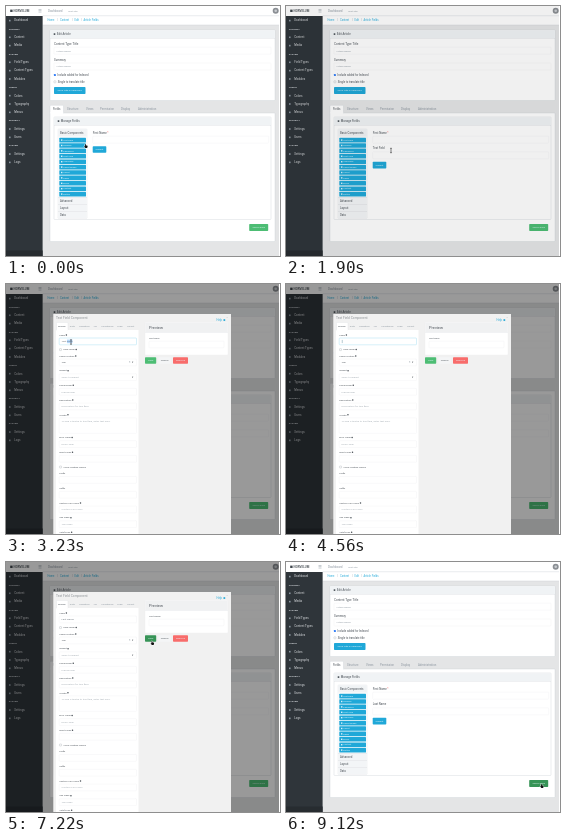
An HTML page with a canvas for the animation above (9500 ms loop, 274x250 px).

```html
<!DOCTYPE html>
<html lang="en">
<head>
<meta charset="utf-8">
<title>Form builder</title>
<style>
  html, body { margin: 0; width: 100%; height: 100%; overflow: hidden; background: #e4e5e6; }
  canvas { display: block; width: 274px; height: 250px; }
</style>
</head>
<body>
<canvas id="stage"></canvas>
<script>
const W = 274, H = 250, PAGE = 273, SIDE = 36.6, LOOP = 9500, STEP = 190;
const canvas = document.getElementById('stage');
const dpr = window.devicePixelRatio || 1;
canvas.width = W * dpr;
canvas.height = H * dpr;
const ctx = canvas.getContext('2d');

const INK = '#454c53', MUTED = '#8a949e', PALE = '#a3abb2';
const LINE = '#dce0e3', FAINT = '#eceef0';
const BLUE = '#20a8d8', GREEN = '#4dbd74', RED = '#f86c6b', DARK = '#2f353a';

function rect(x, y, w, h, fill) {
  ctx.fillStyle = fill;
  ctx.fillRect(x, y, w, h);
}

function box(x, y, w, h, fill, line = LINE, r = 0.7) {
  ctx.beginPath();
  ctx.roundRect(x, y, w, h, r);
  ctx.fillStyle = fill;
  ctx.fill();
  if (!line) return;
  ctx.strokeStyle = line;
  ctx.lineWidth = 0.35;
  ctx.stroke();
}

function disc(x, y, r, fill) {
  ctx.beginPath();
  ctx.arc(x, y, r, 0, Math.PI * 2);
  ctx.fillStyle = fill;
  ctx.fill();
}

// Fonts are set ten times larger and scaled down to keep fractional advances.
function setFont(size, weight = 400) {
  ctx.font = `${weight} ${size * 10}px Roboto, "Liberation Sans", sans-serif`;
}

function text(s, x, y, size = 3, color = INK, weight = 400, align = 'left') {
  ctx.save();
  ctx.translate(x, y);
  ctx.scale(0.1, 0.1);
  setFont(size, weight);
  ctx.textAlign = align;
  ctx.textBaseline = 'middle';
  ctx.fillStyle = color;
  ctx.fillText(s, 0, 0);
  ctx.restore();
}

function textWidth(s, size) {
  setFont(size);
  return ctx.measureText(s).width / 10;
}

function button(s, x, y, w, h, fill, color = '#e8f6fb', size = 2.5) {
  box(x, y, w, h, fill, null);
  text(s, x + w / 2, y + h / 2 + 0.15, size, color, 400, 'center');
}

function checkbox(x, y, on) {
  box(x - 1, y - 1, 2, 2, on ? '#2f7cf6' : '#fff', on ? null : '#a4aab0', 0.4);
}

// Cursor keys: time, x, y
const PATH = [
  [0, 79, 138], [190, 79, 138], [380, 78, 135], [1140, 105, 144.5], [2090, 105, 144.5],
  [2850, 68, 58], [3040, 68, 58], [3610, 56.5, 58], [6080, 56.5, 58],
  [7220, 145.5, 79], [7410, 145, 77], [7600, 145, 77], [8740, 255, 222], [LOOP, 255, 222]
];

function cursorAt(t) {
  const i = PATH.findIndex(k => k[0] > t);
  const [t0, x0, y0] = PATH[i - 1], [t1, x1, y1] = PATH[i];
  const p = (t - t0) / (t1 - t0), e = p * p * (3 - 2 * p);
  return [x0 + (x1 - x0) * e, y0 + (y1 - y0) * e];
}

function cursorKind(t) {
  if (t < 1520) return 'hand';
  if (t < 4560) return 'beam';
  if (t < 6270) return 'none';
  if (t < 7030) return 'arrow';
  if (t < 7410) return 'hand';
  return t < 8740 ? 'arrow' : 'hand';
}

function drawCursor(kind, x, y) {
  if (kind === 'none') return;
  ctx.save();
  ctx.translate(x, y);
  ctx.lineJoin = 'round';
  if (kind === 'beam') {
    ctx.beginPath();
    ctx.moveTo(-0.9, -2.2); ctx.lineTo(0.9, -2.2);
    ctx.moveTo(0, -2.2); ctx.lineTo(0, 2.2);
    ctx.moveTo(-0.9, 2.2); ctx.lineTo(0.9, 2.2);
    ctx.strokeStyle = '#333';
    ctx.lineWidth = 0.6;
    ctx.stroke();
  } else {
    const arrow = [[0, 0], [0, 4.2], [1, 3.3], [1.7, 4.8], [2.3, 4.5], [1.6, 3.1], [2.9, 3]];
    const hand = [[0, 0], [0.8, 0], [0.9, 1.6], [3, 2.1], [3, 3.6], [2.4, 4.8], [0.4, 4.8], [-1, 2.8], [-0.6, 2.3], [0, 2.8]];
    ctx.scale(0.85, 0.85);
    ctx.beginPath();
    (kind === 'arrow' ? arrow : hand).forEach(p => ctx.lineTo(...p));
    ctx.closePath();
    ctx.strokeStyle = '#fff';
    ctx.lineWidth = 0.8;
    ctx.stroke();
    ctx.fillStyle = '#111';
    ctx.fill();
  }
  ctx.restore();
}

// Headings are in capitals; rows share one pitch.
const MENU = ['Dashboard', 'CONTENT', 'Content', 'Media', 'SYSTEM', 'Field Types',
  'Content Types', 'Modules', 'THEME', 'Colors', 'Typography', 'Menus', 'SECURITY',
  'Settings', 'Users', 'SYSTEM', 'Settings', 'Logs'];

function drawFrame() {
  rect(0, 0, W, H, '#e4e5e6');
  rect(0, 0, W, 10, '#fff');
  rect(SIDE, 10, W - SIDE, 9, '#fff');
  rect(SIDE, 9.7, W - SIDE, 0.4, '#c8ced3');
  rect(SIDE, 18.8, W - SIDE, 0.4, '#c8ced3');

  rect(4.2, 3.6, 2.4, 2.4, '#3f464c');
  text('NORVELUM', 7.5, 4.9, 3, '#3f464c', 500);
  for (let i = 0; i < 3; i++) rect(32.5, 3.4 + i * 1.2, 3, 0.45, MUTED);
  text('Dashboard', 42, 4.9, 3, MUTED);
  text('Visit site', 62, 4.9, 2.5, MUTED);
  disc(269.7, 4.8, 3, '#8b8f94');
  disc(269.7, 4.8, 1.3, '#c9ccd0');

  [['Home', 41.5], ['Content', 54], ['Edit', 68.5], ['Article Fields', 77.5]]
    .forEach(([s, x]) => text(s, x, 14.7, 2.6, BLUE));
  [51, 66, 75].forEach(x => text('/', x, 14.7, 2.6, MUTED));

  rect(0, 10, SIDE, H - 10, DARK);
  rect(0, 244.5, SIDE, 5.5, '#272c30');
  MENU.forEach((s, i) => {
    const y = 14.6 + i * 8.34;
    if (s === s.toUpperCase()) return text(s, 2.8, y, 2.4, '#d0d4d8', 700);
    rect(3, y - 0.8, 1.6, 1.6, MUTED);
    text(s, 8.2, y, 2.9, '#dde0e3');
  });
}

function card(x, y, w, h, title) {
  box(x, y, w, h, '#fff', '#c8ced3');
  rect(x + 0.2, y + 0.2, w - 0.4, 7.8, '#f0f3f5');
  rect(x, y + 8, w, 0.3, '#c8ced3');
  rect(x + 3.7, y + 3.3, 1.6, 1.6, INK);
  text(title, x + 6.8, y + 4.3, 2.9);
}

function input(x, y, w, s, h = 7) {
  box(x, y, w, h, '#fff', FAINT);
  if (s) text(s, x + 2.3, y + 3.6, 2.5, MUTED);
}

function drawArticleCard() {
  card(44, 24, 225, 70.5, 'Edit Article');
  text('Content Type Title', 48, 38.2, 3);
  input(48, 41.2, 217, 'Article Fields');
  text('Summary', 48, 54, 2.8);
  input(48, 57, 217, 'Article Fields');
  checkbox(48.9, 69, true);
  text('Include added for Indexed', 51.5, 69.1, 2.7);
  checkbox(48.9, 75.8, false);
  text('Single to translate title', 51.8, 75.9, 2.7);
  button('Save Title & Summary', 48, 81, 31.5, 7, BLUE);
}

const PARTS = ['Text Field', 'Number', 'Password', 'Text Area', 'Checkbox', 'Select Boxes',
  'Select', 'Radio', 'Email', 'Content', 'Button'];

function part(s, x, y, w, fill = BLUE) {
  box(x, y, w, 4.6, fill, null, 0.5);
  rect(x + 1.7, y + 1.6, 1.4, 1.4, '#d9f0f9');
  text(s, x + 4, y + 2.4, 2.3, '#e8f6fb');
}

function drawBuilder(t) {
  box(44, 107, 225, 128.5, '#fff', '#c8ced3');
  box(44, 99.3, 13.5, 8, '#fff', '#c8ced3');
  rect(44.3, 106, 12.9, 2, '#fff');
  text('Fields', 47, 103.6, 2.8);
  [['Structure', 61], ['Views', 80], ['Permission', 94], ['Display', 115], ['Administration', 132]]
    .forEach(([s, x]) => text(s, x, 103.6, 2.8, MUTED));

  card(48, 111, 217, 102.5, 'Manage Fields');
  box(52, 123, 29, 89.5, '#fff', LINE);
  rect(52.2, 123.2, 28.6, 7.4, '#f0f3f5');
  text('Basic Components', 54, 126.9, 2.8);
  const over = t >= 380 && t < 1520;
  PARTS.forEach((s, i) => part(s, 53.3, 131.8 + i * 5.4, 26.7, over && i === 0 ? '#1985ac' : BLUE));
  ['Advanced', 'Layout', 'Data'].forEach((s, i) => {
    const y = 191.4 + i * 7;
    rect(52.2, y, 28.6, 6.8, '#f3f5f7');
    rect(52, y - 0.2, 29, 0.3, '#c8ced3');
    text(s, 54, y + 3.5, 2.8);
  });

  text('First Name', 86.7, 127.3, 2.9);
  text('*', 101.2, 127.5, 2.9, RED);
  input(86.7, 130.2, 176, '');
  const dragging = t >= 760 && t < 1520;
  if (dragging) part('Text Field', 86.7, 140.5, 176, '#7fcde8');
  if (t >= 1520) {
    text(t < 7410 ? 'Text Field' : 'Last Name', 86.7, 142.6, 2.8);
    input(86.7, 145.8, 176, '');
  }
  button('Submit', 86.7, t >= 1520 ? 155.8 : dragging ? 147 : 140.2, 13.6, 6.6, BLUE);
  button('Save Fields', 243.2, 218, 19, 7, t >= 9120 ? '#379457' : t >= 8740 ? '#3ea662' : GREEN);
  if (t >= 570 && t < 1520) {
    const [x, y] = cursorAt(t);
    ctx.globalAlpha = 0.8;
    part('Text Field', x - 25, y - 2.3, 26.7);
    ctx.globalAlpha = 1;
  }
}

// Settings: label, label y, placeholder
const SETTINGS = [
  ['Label Position', 71.9, 'Top'], ['Widget', 86.7, 'Select a widget'],
  ['Placeholder', 101.3, 'Placeholder'], ['Description', 116, 'Description for this field.'],
  ['Tooltip', 130.8, 'To add a tooltip to this field, enter text here.'],
  ['Error Label', 153.6, 'Error Label'], ['Input Mask', 168.3, ''],
  ['Prefix', 189.4, ''], ['Suffix', 204.2, ''],
  ['Custom CSS Class', 219, 'Custom CSS Class'], ['Tab Index', 233.7, 'Tab Index'],
  ['Autofocus', 248.2, '']
];
const SMALL = 2.4, HINT = 2.55;

function settingLabel(s, y) {
  text(s, 53.2, y, SMALL);
  if (s.endsWith('fix')) return;
  disc(54.6 + textWidth(s, SMALL), y, 0.75, INK);
}

function labelValue(t) {
  if (t < 4560) return 'Text Field';
  if (t < 4750) return '';
  const k = Math.max(0, Math.min(6, (t - 4940) / STEP));
  return 'Last Name'.slice(0, Math.round(1 + 8 * k / 6));
}

function drawLabelInput(t) {
  const value = labelValue(t), focus = t >= 3040 && t < 7030;
  settingLabel('Label', 51);
  box(53.2, 54, 77.3, 6.8, '#fff', focus ? '#8ad4ee' : FAINT);
  const width = textWidth(value, HINT);
  if (t >= 3040 && t < 4560) {
    const p = Math.min(1, (t - 2850) / 760);
    rect(55.5 + width * (1 - p), 55.6, width * p, 3.6, '#b3d7fb');
  }
  text(value, 55.5, 57.6, HINT, '#68717a');
  if (focus && t >= 4560) rect(55.9 + width, 55.9, 0.4, 3.2, '#4b7c8f');
}

function drawDialog(t) {
  rect(47.3, 30, 177.7, 220, '#f1f1f1');
  text('Text Field Component', 50, 34.3, 3.25, '#8b9095');
  text('Help', 210.5, 36.2, 2.7, BLUE);
  rect(217.5, 35.2, 1.7, 1.7, BLUE);
  text('×', 220.5, 33.4, 2.4, '#aaa');

  rect(50, 46, 82.5, 204, '#fff');
  box(50.5, 38.5, 11.5, 8, '#fff', LINE);
  rect(50.8, 45.5, 10.9, 1.5, '#fff');
  [['Display', 52], ['Data', 63.8], ['Validation', 73], ['API', 87.5], ['Conditional', 95.3],
    ['Logic', 111], ['Layout', 121]]
    .forEach(([s, x], i) => text(s, x, 42.6, SMALL, i ? MUTED : INK));

  drawLabelInput(t);
  checkbox(54.5, 65.6, false);
  text('Hide Label', 57.3, 65.7, SMALL);
  disc(70.2, 65.6, 0.75, INK);
  SETTINGS.forEach(([s, y, hint], i) => {
    settingLabel(s, y);
    box(53.2, y + 3.1, 77.3, i === 4 ? 15.5 : 6.8, '#fff', FAINT);
    text(hint, 55.5, y + 6.7, HINT, i === 0 ? INK : PALE);
    if (i < 2) text('▾', 126, y + 6.6, 2.6);
  });
  text('×', 123, 78.5, 2.6, MUTED);
  checkbox(54.5, 183, false);
  text('Allow Multiple Masks', 57.3, 183.1, SMALL);

  box(139, 38.5, 83, 32.5, '#fff', FAINT);
  rect(139.2, 38.7, 82.6, 9.7, '#f0f1f2');
  rect(139, 48.4, 83, 0.3, LINE);
  text('Preview', 143, 43.8, 4);
  text(t < 4750 ? 'Text Field' : labelValue(t), 143, 54.3, SMALL);
  input(143, 57.2, 75, '', 6.6);
  button('Save', 139, 73.2, 11.2, 6.6, t >= 7030 ? '#379457' : GREEN);
  button('Cancel', 152.3, 73.2, 12.5, 6.6, '#f4f5f6', INK);
  button('Remove', 167, 73.2, 15, 6.6, RED);
}

function draw(t) {
  ctx.setTransform(dpr, 0, 0, dpr, 0, 0);
  drawFrame();
  drawArticleCard();
  drawBuilder(t);
  if (t >= 1900 && t < 7410) {
    rect(0, 0, PAGE, H, `rgba(0, 0, 0, ${t < 2090 ? 0.06 : 0.4})`);
    if (t >= 2090) drawDialog(t);
  }
  rect(PAGE, 0, W - PAGE, H, '#fff');
  drawCursor(cursorKind(t), ...cursorAt(t));
}

function tick() {
  draw(Math.floor(performance.now() % LOOP / STEP) * STEP);
  requestAnimationFrame(tick);
}
tick();
</script>
</body>
</html>
```
